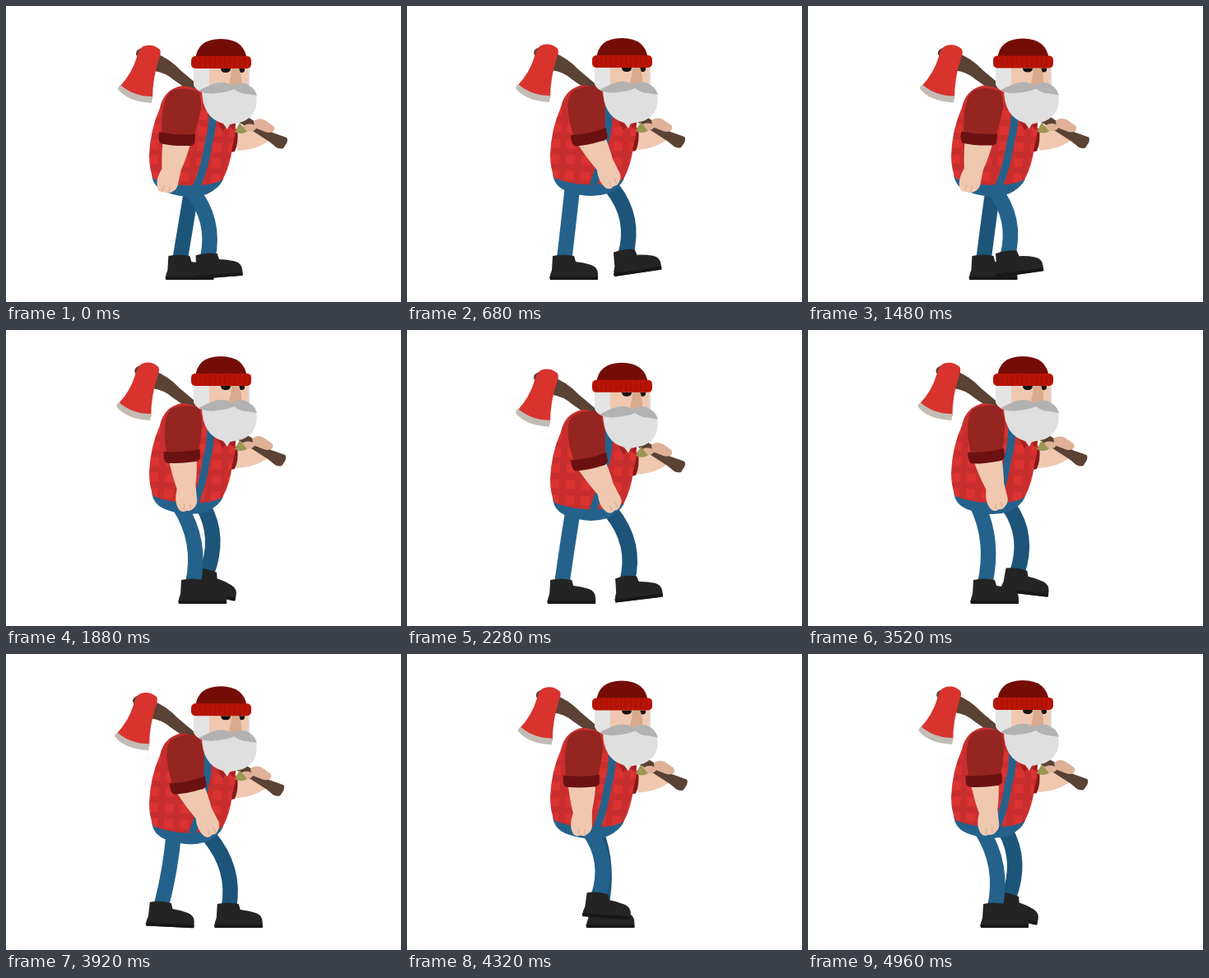
Write an HTML page that moves like this. It is 480 px wide and 360 px high and loops after 5000 ms.

```html
<!DOCTYPE html>
<html lang="en">
<head>
<meta charset="utf-8">
<title>Walking lumberjack</title>
<style>
  html, body { margin: 0; width: 100%; height: 100%; overflow: hidden; background: #fff; }
  svg { display: block; width: 100vw; height: 100vh; }
</style>
</head>
<body>
<svg viewBox="0 0 480 360">
  <defs>
    <pattern id="plaid" width="19" height="19" patternUnits="userSpaceOnUse" patternTransform="translate(3 3) rotate(3)">
      <rect width="19" height="19" fill="#db3331"/>
      <path d="M0 5H19M5 0V19" stroke="#a82328" stroke-width="8" opacity=".36"/>
    </pattern>
    <g id="boot">
      <path d="M-14-29Q-1-32 12-29L14-22Q24-21 33-18Q41-15 41-7V0H-17V-6Q-16-9-15-12Z" fill="#242424"/>
      <path d="M-18-4H41V-1L39 0H-17Z" fill="#171717"/>
    </g>
  </defs>

  <g fill="none" stroke-linecap="round" stroke-width="18.5">
    <path id="farLeg" stroke="#1d5479"/>
    <use id="farBoot" href="#boot"/>
    <path id="nearLeg" stroke="#24628c"/>
    <use id="nearBoot" href="#boot"/>
  </g>

  <g id="body">
    <g id="axe">
      <path d="M276 142Q274 158 280 168Q304 167 322 153L316 138L290 136Z" fill="#f0c8b0"/>
      <path d="M156 51Q155 45 164 43L178 49Q196 55 211 71L236 92L322 146L339 152Q341 154 339 159L335 165Q329 167 323 161L318 157L290 139L228 100L202 82Q192 73 178 71L160 58Z" fill="#5a4234"/>
      <path d="M165 41Q176 37 185 45Q187 49 184 56Q176 80 176 105Q154 103 137 89Q151 74 157 54Q160 43 165 41Z" fill="#d8332d"/>
      <path d="M137 88Q153 102 176 102L175 110Q145 108 134 93Q134 90 137 88Z" fill="#c2bcb5"/>
      <path d="M299 132Q305 127 313 131L323 138Q326 142 322 145Q318 147 313 145L300 140Z" fill="#dfb198"/>
      <ellipse cx="294" cy="140" rx="8" ry="4.500" fill="#dfb198"/>
    </g>
    <path d="M271 139L281 142Q283 158 278 169L268 171Z" fill="#85191a"/>
    <path d="M177 196Q178 213 196 219Q222 228 244 221Q258 215 264 200Z" fill="#24628c"/>
    <path d="M214 89Q192 93 187 116Q175 143 174 174Q174 190 179 202Q203 212 232 210Q252 210 263 204Q273 185 275 163Q281 144 278 128L240 94Z" fill="url(#plaid)"/>
    <path d="M226 209Q246 213 264 203Q258 215 244 220L225 221Z" fill="#24628c"/>
    <path id="strap" d="M248 112Q250 135 243 159Q239 187 229 211" fill="none" stroke="#24628c" stroke-width="9"/>
    <path d="M256 131L270 141L280 131L277 143L270 136L263 144Z" fill="#a52021"/>
    <path d="M278 145L284 134L293 145Q285 149 278 145Z" fill="#9b9653"/>

    <g id="arm">
      <g id="fore">
        <path d="M-17-3L18-3Q17 20 13 37Q13 46 13 52Q14 61 8 65Q4 69-1 67Q-8 70-11 63Q-15 54-10 40Q-15 20-17-3Z" fill="#f0c8b0"/>
        <path d="M-4 66L-3 59M4 66L4 59" stroke="#d5a78d" stroke-width="1"/>
      </g>
      <path d="M-10-7Q6-13 22-7Q28 4 25 22L20 50H-18Q-22 22-18 7Q-16-3-10-7Z" fill="#952521"/>
      <path d="M-22 45Q0 48 22 44L22 55Q20 59 14 59Q-4 61-19 59Q-23 57-22 45Z" fill="#6c1112"/>
    </g>

    <path d="M246 64H294V104H246Z" fill="#f0c8b0"/>
    <path d="M228 66H247V98Q232 98 228 88Z" fill="#e4e4e4"/>
    <path d="M294 66H296V98H294Z" fill="#dcdcdc"/>
    <path d="M261 68H273Q273 73 267 73Q261 73 261 68ZM280 68H290Q291 73 286 73Q280 73 280 68Z" fill="#161313"/>
    <path d="M274 67H283Q287 78 286 86Q279 93 271 86Q274 77 274 67Z" fill="#d9aa8d"/>
    <path d="M238 93Q255 91 275 93Q299 91 304 100Q308 124 287 133L272 136L269 142L264 135Q238 128 238 93Z" fill="#dfdfdf"/>
    <path d="M276 89Q264 82 251 87Q241 91 234 95Q244 100 255 98Q269 97 277 93Q285 99 294 99L305 101Q302 90 290 86Q282 84 276 89Z" fill="#b2b2b2"/>
    <path d="M230 58Q232 32 261 32Q290 32 293 58Z" fill="#750d07"/>
    <rect x="225" y="53" width="73" height="15" rx="5" fill="#b91506"/>
    <path d="M229 60.500H296" stroke="#ad1105" stroke-width="12" stroke-dasharray="2 4"/>
  </g>
</svg>
<script>
const LOOP = 5000, STEP = 40, STRIDE = 1540;
const $ = id => document.getElementById(id);
const move = (id, value) => $(id).setAttribute("transform", value);
const wave = turns => Math.cos(2 * Math.PI * turns);
const wrap = turns => turns - Math.floor(turns);

// First half of a stride: foot planted, sliding back. Second half: foot swings forward.
function drawLeg(name, stride, offset, bob) {
  const p = wrap(stride - .025);
  const air = Math.max(0, 2 * p - 1);
  const lift = Math.sin(Math.PI * air);
  const tilt = lift * (22 - 56 * air * air);
  const x = offset + 217 + 30 * wave(p) + 8 * lift * lift;
  const y = 333 - 13 * lift;

  const a = tilt * Math.PI / 180;
  const ankleX = x + 24 * Math.sin(a), ankleY = y - 24 * Math.cos(a);
  const hipX = offset + 213 + 12 * wave(stride + .06), hipY = 214 + bob;
  // The knee straightens only at the back of the stride
  const bend = 21 * (1 - (.5 - .5 * wave(stride + .03)) ** 4);
  const kneeX = (hipX + ankleX) / 2 + bend, kneeY = (hipY + ankleY) / 2 - 4;

  $(name + "Leg").setAttribute("d", `M${hipX} ${hipY}Q${kneeX} ${kneeY} ${ankleX} ${ankleY}`);
  move(name + "Boot", `translate(${x} ${y}) rotate(${tilt})`);
}

function draw(t) {
  const stride = t / STRIDE;
  const swing = wave(stride - .99);
  const bob = 3.8 + 4.2 * wave(2 * stride);
  const upper = -3 + 8 * swing, fore = -8 + 20 * swing;
  move("body", `translate(0 ${bob})`);
  move("axe", `translate(${2 * swing} 0)`);
  move("strap", `translate(${3 * swing} 0)`);
  move("arm", `translate(212 102) rotate(${upper})`);
  move("fore", `translate(0 51) rotate(${fore - upper})`);
  drawLeg("near", stride, 0, bob);
  drawLeg("far", stride - .5, 24, bob);
}

const start = performance.now();
function tick() {
  const t = (performance.now() - start) % LOOP;
  draw(Math.floor(t / STEP) * STEP);
  requestAnimationFrame(tick);
}
tick();
</script>
</body>
</html>
```
